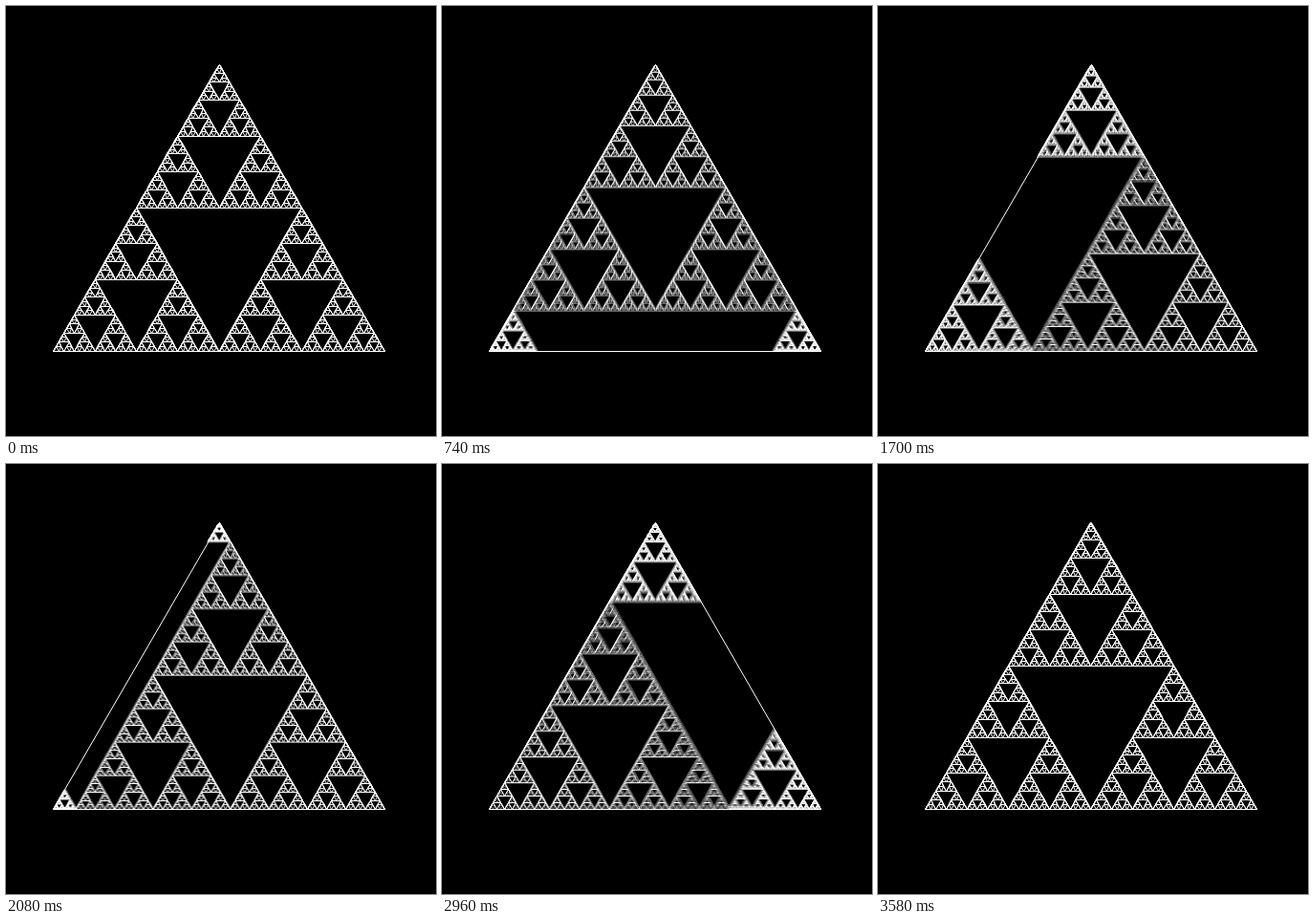
These frames come from a looping animation (450 px wide and 450 px high, 3.6 s). An HTML page with a canvas:

```html
<!DOCTYPE html>
<html lang="en">
<head>
<meta charset="utf-8">
<title>Sierpinski loop</title>
<style>
  html, body { margin: 0; width: 100%; height: 100%; overflow: hidden; background: #000; }
  canvas { display: block; }
</style>
</head>
<body>
<canvas id="stage" width="450" height="450"></canvas>
<script>
const SIZE = 450, LOOP = 3600, PHASE = 1200, STEP = 20, SAMPLES = 5, DEPTH = 6;
const stage = document.getElementById('stage').getContext('2d');
const layerCanvas = document.createElement('canvas');
layerCanvas.width = layerCanvas.height = SIZE;
const layer = layerCanvas.getContext('2d');

// Corners in the order in which their copies grow: top, right, left.
const corners = [-90, 30, 150].map(deg => {
  const a = deg * Math.PI / 180;
  return [223 + 200 * Math.cos(a), 261 + 200 * Math.sin(a)];
});
const mid = (p, q) => [(p[0] + q[0]) / 2, (p[1] + q[1]) / 2];
const ease = x => x < 0.5 ? 2 * x * x : 1 - 2 * (1 - x) ** 2;

// Vertices sit on pixel centres, which keeps thin lines crisp.
const snap = v => Math.floor(v + 1e-4) + 0.5;

function addTriangle(path, [a, b, c]) {
  path.moveTo(snap(a[0]), snap(a[1]));
  path.lineTo(snap(b[0]), snap(b[1]));
  path.lineTo(snap(c[0]), snap(c[1]));
  path.closePath();
}

function subdivide(paths, [a, b, c], level = 0) {
  if (b[0] - c[0] < 1) return;
  addTriangle(paths[level], [a, b, c]);
  if (level === DEPTH) return;
  const ab = mid(a, b), bc = mid(b, c), ca = mid(c, a);
  for (const t of [[a, ab, ca], [ab, b, bc], [ca, bc, c]]) subdivide(paths, t, level + 1);
}

function drawLayer(time) {
  const phase = Math.floor(time / PHASE) % 3;
  const p = ease(time % PHASE / PHASE);
  const grown = 0.5 + p / 2;

  layer.globalAlpha = 1;
  layer.fillStyle = '#000';
  layer.fillRect(0, 0, SIZE, SIZE);
  layer.strokeStyle = '#fff';
  layer.lineWidth = 1;

  const outline = new Path2D();
  addTriangle(outline, corners);
  layer.stroke(outline);

  const paths = Array.from({ length: DEPTH + 1 }, () => new Path2D());
  corners.forEach(([x, y], i) => {
    const k = i === phase ? grown : 1 - grown;
    subdivide(paths, corners.map(([cx, cy]) => [x + (cx - x) * k, y + (cy - y) * k]));
  });
  // The smallest level fades in while the growing copy doubles in size.
  paths.forEach((path, level) => {
    layer.globalAlpha = level === DEPTH ? p : 1;
    layer.stroke(path);
  });
}

let lastTime = -1;
function render(now) {
  requestAnimationFrame(render);
  const time = Math.floor(now % LOOP / STEP) * STEP;
  if (time === lastTime) return;
  lastTime = time;

  stage.globalCompositeOperation = 'source-over';
  stage.globalAlpha = 1;
  stage.fillStyle = '#000';
  stage.fillRect(0, 0, SIZE, SIZE);
  // Motion blur: average several moments of one step.
  stage.globalCompositeOperation = 'lighter';
  stage.globalAlpha = 1 / SAMPLES;
  for (let i = 0; i < SAMPLES; i++) {
    drawLayer(time + STEP * i / SAMPLES);
    stage.drawImage(layerCanvas, 0, 0);
  }
}
requestAnimationFrame(render);
</script>
</body>
</html>
```
